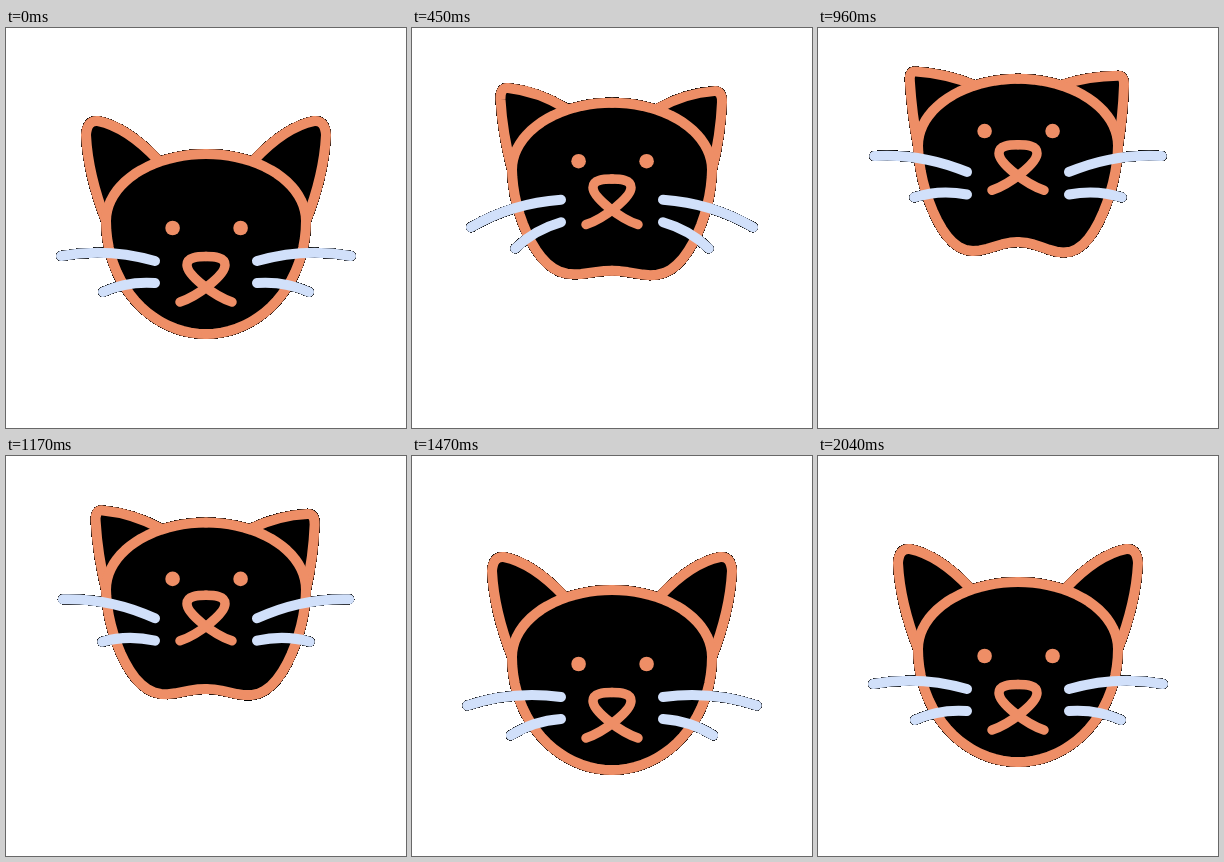
An HTML page that plays this animation: 400x400 px, repeating every 2.34 s.

```html
<!DOCTYPE html>
<html lang="en">
<head>
<meta charset="utf-8">
<title>Jumping cat</title>
<style>
  html, body { margin: 0; height: 100%; overflow: hidden; background: #fff; }
  svg { display: block; width: 100vw; height: 100vh; }
  path { stroke-linecap: round; stroke-linejoin: round; fill: none; stroke-width: 10; }
  .edge path { stroke: #000; stroke-width: 10.8; shape-rendering: crispEdges; }
  .fur path { fill: #000; stroke: none; }
  .line path { stroke: #ee8e66; }
  .whisker path { stroke: #d1e0fa; }
  .face path { stroke: #ee8e66; stroke-width: 9.5; }
  .face circle { fill: #ee8e66; }
</style>
</head>
<body>
<svg id="stage" viewBox="0 0 400 400"></svg>
<script>
const LOOP = 2340, STEP = 30, LAST = 2040;

// Left ear: x, y at rest, then the shift at the top of the jump.
const EAR = [
  [100, 193, 0, -76], [82, 147, 12, -62], [80, 107, 12, -54], [81, 92, 10, -50],
  [92, 93, 6, -50], [121, 99, 7, -54], [152, 132, 4, -76]
];
const WHISKERS = [
  { y: 233, travel: -90, d: 'M0 0Q-47 -13.5 -94 -5' },
  { y: 255, travel: -89.5, d: 'M0 0Q-28 -2 -52 9' }
];
// [time, degrees]
const SWING = [[0, 0], [180, -2.5], [450, 20], [1100, -10], [1500, 8.5], [2040, 0]];

const stage = document.getElementById('stage');
const add = (parent, tag, attrs = {}) => {
  const el = document.createElementNS('http://www.w3.org/2000/svg', tag);
  for (const k in attrs) el.setAttribute(k, attrs[k]);
  return parent.appendChild(el);
};
const layer = name => add(stage, 'g', { class: name });
const side = (parent, right) => add(parent, 'g', right ? { transform: 'matrix(-1 0 0 1 400 0)' } : {});
const move = (el, value) => el.setAttribute('transform', value);

const clamp = x => Math.min(1, Math.max(0, x));
const mix = (a, b, p) => a + (b - a) * p;
const part = (t, a, b) => clamp((t - a) / (b - a));
const smooth = p => (1 - Math.cos(Math.PI * p)) / 2;
const point = (x, y) => `${x.toFixed(2)} ${y.toFixed(2)} `;

// The right ear droops a little in the air.
function ear(right, h, rise) {
  const p = EAR.map(([x, y, dx, dy], i) => {
    const droop = right * 5 * Math.sin(Math.PI * i / 6);
    return point(x + h * (dx + droop / 2), rise(y, dy + droop));
  });
  return `M${p[0]}Q${p.slice(1).join('')}`;
}

// Half an egg; in the air a wave lifts the chin and leaves a cheek on each side.
function head(right, h, rise) {
  const n = 40, wave = 14 + right, p = [];
  for (let i = 0; i <= n; i++) {
    const a = Math.PI * i / n, s = Math.sin(a), c = Math.cos(a);
    const travel = c > 0 ? 76 : 93 - wave + wave * Math.cos(1.5 * Math.PI * s);
    p.push(point(200 - 100 * s, rise(193 - c * (c > 0 ? 67 : 113), -travel)));
  }
  return `M${p.join('L')}`;
}

const edge = layer('edge'), fur = layer('fur'), line = layer('line');
const face = layer('face'), whisker = layer('whisker');
const eyes = add(face, 'g'), muzzle = add(face, 'g');
const shapes = [], hairs = [];

for (const right of [0, 1]) {
  const groups = [edge, fur, line].map(g => side(g, right));
  for (const make of [ear, head])
    shapes.push({ make, right, els: groups.map(g => add(g, 'path')) });
  const tips = [groups[0], side(whisker, right)];
  for (const w of WHISKERS)
    hairs.push({ ...w, els: tips.map(g => add(g, 'path', { d: w.d })) });
  add(eyes, 'circle', { cx: 166.6 + 68 * right, cy: 200, r: 7.3 });
  add(side(muzzle, right), 'path', { d: 'M174 274C192 268 219 247 219 237C219 229 208 228.5 200 228.5' });
}

function lift(t) {
  if (t < 762) return 1 - (1 - part(t, 210, 742)) ** 2;
  return 1 - part(t, 782, 1440) ** 3;
}
const crouch = t => 8 * (smooth(part(t, 0, 210)) - smooth(part(t, 1470, 1725)));

function swing(t) {
  let i = 1;
  while (i < SWING.length - 1 && t > SWING[i][0]) i++;
  const [t0, a] = SWING[i - 1], [t1, b] = SWING[i];
  return mix(a, b, smooth(part(t, t0, t1)));
}

function draw(t) {
  const h = lift(t) * 1.01, dip = crouch(t), angle = -swing(t);
  const rise = (y, travel) => y + mix(dip, travel, h);
  for (const s of shapes) {
    const d = s.make(s.right, h, rise);
    s.els.forEach(el => el.setAttribute('d', d));
  }
  for (const w of hairs)
    w.els.forEach(el => move(el, `translate(149 ${rise(w.y, w.travel)}) rotate(${angle})`));
  move(eyes, `translate(0 ${rise(0, -98)})`);
  move(muzzle, `translate(0 ${rise(0, -113)})`);
}

const start = performance.now();
function tick() {
  const t = (performance.now() - start) % LOOP;
  draw(Math.min(LAST, Math.floor(t / STEP) * STEP));
  requestAnimationFrame(tick);
}
tick();
</script>
</body>
</html>
```
